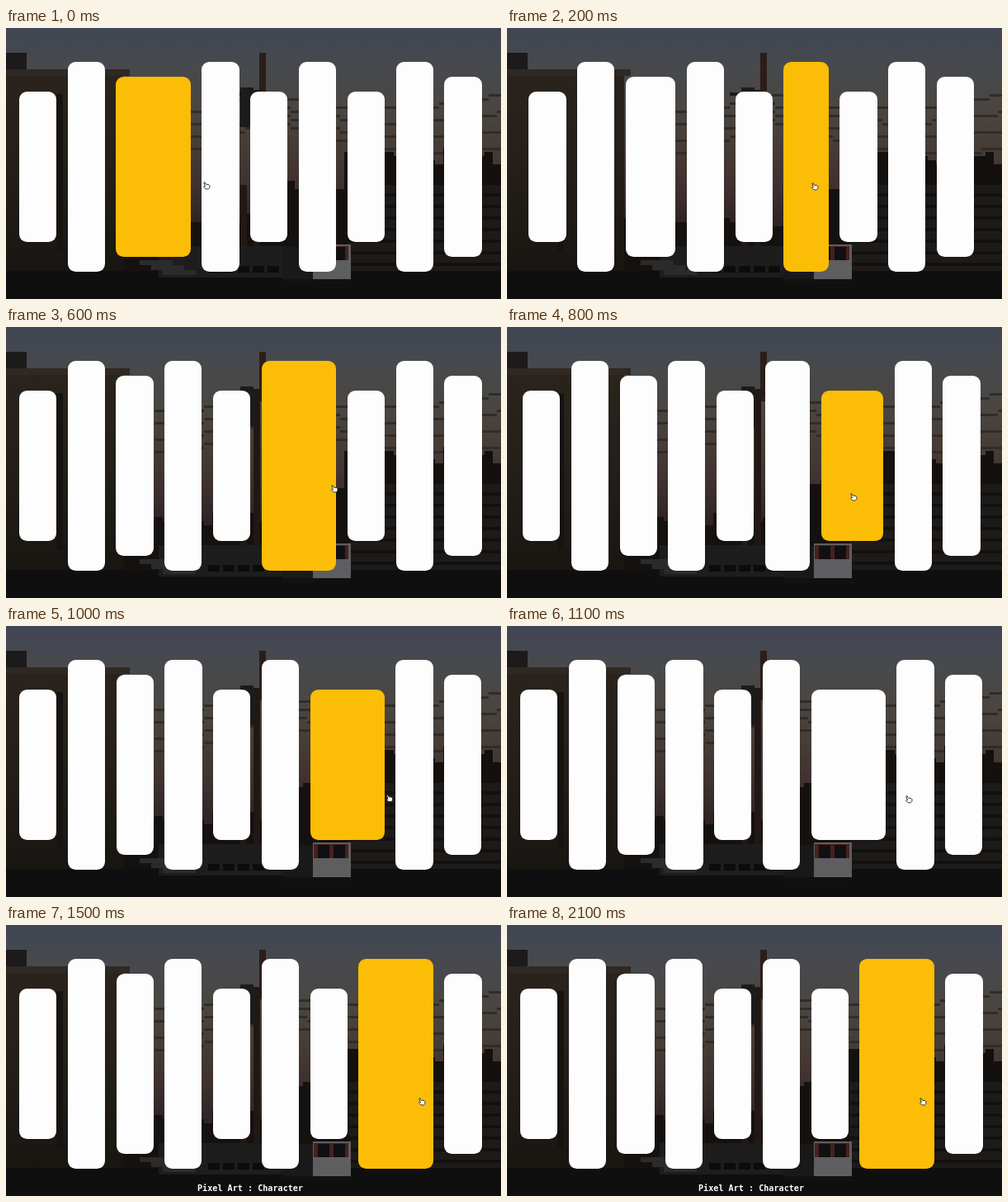
An HTML page with a canvas for the animation above (2.3 s loop, 600x328 px).

```html
<!DOCTYPE html>
<html lang="en">
<head>
<meta charset="utf-8">
<title>Hover bars</title>
<style>
html, body { margin: 0; width: 100%; height: 100%; overflow: hidden; background: #0e0f0e; }
canvas, svg, #bars { position: absolute; left: 0; top: 0; width: 600px; height: 328px; }
#bars { box-sizing: border-box; padding: 8px 7.5px 0 0;
  display: flex; justify-content: center; align-items: center; gap: 13.6px; }
#bars div { flex: none; border-radius: 9.5px; }
#caption { position: absolute; left: 232px; top: 312px; color: #fff; white-space: pre;
  font: bold 10.15px/13px "DejaVu Sans Mono", monospace; }
</style>
</head>
<body>
<canvas id="scene" width="600" height="328"></canvas>
<div id="bars"></div>
<div id="caption">Pixel Art : Character</div>
<svg viewBox="0 0 600 328">
  <path id="hand" fill="#fff" stroke="#222" stroke-width=".9" stroke-linejoin="round"
    d="M-3.2-4l1-.4 1.7 2.6 3.3.4 1.2 1.2-.2 2.7-1.5 1.4h-3.2l-2.5-2.5.7-.9 1.1.5z"/>
</svg>
<script>
const LOOP = 2300, STEP = 100, EASE_MS = 400;
const SLIM = 45.2, UNIT = 36.35, UNITS = '576757576';
// times at which the pointer enters and leaves a bar
const HOVERS = { 2: [-900, 44], 5: [136, 600], 6: [644, 1095], 7: [1110, LOOP] };
// time, x, y
const TRACK = [[0, 243, 191], [200, 373, 192], [600, 398, 196],
  [800, 420, 206], [1100, 487, 210], [1300, 504, 214], [LOOP, 504, 214]];

const byId = id => document.getElementById(id);
const mix = (a, b, u) => a + (b - a) * u;

// --- dim pixel street behind the bars ---
const ctx = byId('scene').getContext('2d');
const CELL = 5;
let seed = 7;
const random = () => (seed = seed * 16807 % 2147483647) / 2147483647;
const snap = v => Math.round(v / CELL) * CELL;

function box(color, x, y, w, h) {
  ctx.fillStyle = color;
  ctx.fillRect(x, y, w, h);
}

function fade(height, ...colors) {
  const g = ctx.createLinearGradient(0, 0, 0, height);
  colors.forEach((c, i) => g.addColorStop(i / (colors.length - 1), c));
  return g;
}

function skyline(color, x0, x1, y, rough) {
  for (let x = x0; x < x1; x += 2 * CELL)
    box(color, x, snap(y + (random() - .5) * rough), 2 * CELL, 328);
}

function wire(x0, y0, x1, y1, sag) {
  for (let x = x0; x < x1; x += 2 * CELL) {
    const u = (x - x0) / (x1 - x0);
    box('#302c29', x, snap(mix(y0, y1, u) + 4 * sag * u * (1 - u)), 2 * CELL, 3);
  }
}

function paintScene() {
  box(fade(240, '#404654', '#47494c', '#4a4641', '#463c35', '#3f3030', '#2d2322'), 0, 0, 600, 328);
  for (let i = 0; i < 4; i++) {
    wire(180, 98 + 18 * i, 300, 80 + 12 * i, 8);
    wire(315, 80 + 10 * i, 600, 78 + 22 * i, 18);
  }
  skyline('#15110f', 120, 350, 232, 20);
  skyline('#15110f', 340, 410, 185, 20);
  skyline('#13100e', 410, 600, 155, 20);
  for (let y = 190; y < 290; y += 14) box('#1d1b19', 415, y, 185, 10);

  // left building
  box('#1c1a1a', 0, 30, 25, 20);
  box(fade(328, '#2d261f', '#241f19', '#161310'), 0, 50, 142, 278);
  box('#302822', 0, 50, 150, 8);
  box('#171310', 61, 80, 8, 190);

  // poles
  box('#2d1d18', 307, 30, 8, 60);
  box('#211815', 300, 75, 8, 230);
  box('#231814', 284, 190, 8, 115);
  box('#1b1b1d', 284, 72, 16, 48);
  box('#211a18', 270, 78, 48, 4);

  // street and parked cars
  box('#0e0f0e', 0, 294, 600, 34);
  box('#1d1d1e', 185, 264, 158, 38);
  for (let x = 245; x < 340; x += 18) box('#0c0c0d', x, 288, 14, 8);
  for (let i = 0; i < 3; i++) box('#2c2b2b', 162 + 14 * i, 281 + 6 * i, 40, 6);
  box('#19191a', 335, 265, 40, 42);
  box('#5e5e60', 372, 262, 46, 45);
  box('#47211d', 373, 264, 42, 17);
  for (const x of [378, 397]) box('#101012', x, 265, 14, 16);
  box('#111112', 335, 304, 84, 6);
}

// --- motion ---
// CSS "ease": cubic-bezier(.25, .1, .25, 1)
function ease(p) {
  if (p <= 0) return 0;
  if (p >= 1) return 1;
  const bezier = (s, a, b) => 3 * s * (1 - s) ** 2 * a + 3 * s * s * (1 - s) * b + s ** 3;
  let lo = 0, hi = 1;
  for (let i = 0; i < 24; i++) {
    const mid = (lo + hi) / 2;
    if (bezier(mid, .25, .25) < p) lo = mid; else hi = mid;
  }
  return bezier(lo, .1, 1);
}

function pointer(t) {
  const i = TRACK.findIndex(key => key[0] > t);
  const [t0, x0, y0] = TRACK[i - 1], [t1, x1, y1] = TRACK[i];
  const u = (t - t0) / (t1 - t0);
  return [mix(x0, x1, u), mix(y0, y1, u)];
}

const bars = [...UNITS].map(n => {
  const bar = byId('bars').appendChild(document.createElement('div'));
  bar.style.height = n * UNIT + 'px';
  return bar;
});

function draw(now) {
  const t = Math.floor(now % LOOP / STEP) * STEP;
  bars.forEach((bar, i) => {
    const [enter, leave] = HOVERS[i] || [LOOP, LOOP];
    const grown = ease((t - enter) / EASE_MS) - ease((t - leave) / EASE_MS);
    bar.style.width = SLIM * (1 + grown) + 'px';
    bar.style.background = t >= enter && t <= leave ? '#fcbd06' : '#fdfdfd';
  });
  byId('hand').setAttribute('transform', `translate(${pointer(t)})`);
  byId('caption').hidden = t < 1200;
  requestAnimationFrame(draw);
}

paintScene();
draw(0);
</script>
</body>
</html>
```
